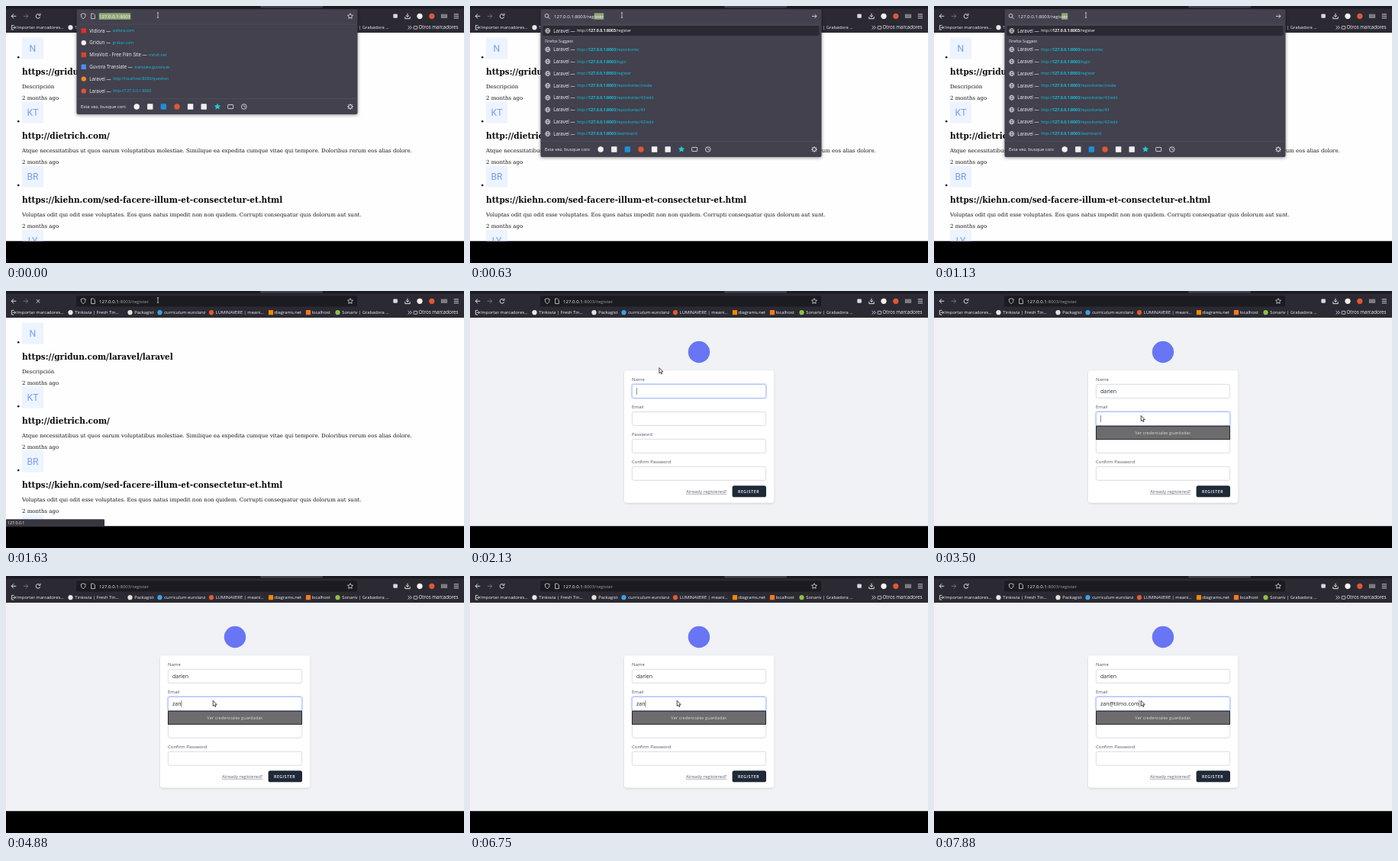
Animation, 600 px wide and 337 px high, one loop 8000 ms. Source, as an HTML page with a canvas:

```html
<!DOCTYPE html>
<html lang="es">
<head>
<meta charset="utf-8">
<title>Register</title>
<style>
html, body { margin: 0; width: 100%; height: 100%; overflow: hidden; background: #000; }
canvas { display: block; width: 600px; height: 337px; }
</style>
</head>
<body>
<canvas id="stage"></canvas>
<script>
const LOOP = 8000;
const UI = '"Open Sans", "Noto Sans", sans-serif';
const SERIF = '"DejaVu Serif", "Noto Serif", serif';
const canvas = document.getElementById('stage');
const c = canvas.getContext('2d');
const dpr = window.devicePixelRatio || 1;
canvas.width = 600 * dpr;
canvas.height = 337 * dpr;

const LIGHT = '#f4f4f7', DIM = '#9d9ca6', BAR = '#2b2a33', DARK = '#1c1b22', PANEL = '#42414d', CYAN = '#19bfdc', SELECT = '#8fa876';

// ---------- helpers ----------
function rect(x, y, w, h, fill, r = 0) {
  c.beginPath();
  c.roundRect(x, y, w, h, r);
  c.fillStyle = fill;
  c.fill();
}

function frame(x, y, w, h, color, r = 0, lw = 0.6) {
  c.beginPath();
  c.roundRect(x, y, w, h, r);
  c.strokeStyle = color;
  c.lineWidth = lw;
  c.stroke();
}

function dot(x, y, r, fill) {
  c.beginPath();
  c.arc(x, y, r, 0, 7);
  c.fillStyle = fill;
  c.fill();
}

function ring(x, y, r, color, lw = 0.8, from = 0, to = 7) {
  c.beginPath();
  c.arc(x, y, r, from, to);
  c.strokeStyle = color;
  c.lineWidth = lw;
  c.stroke();
}

function line(color, lw, ...p) {
  c.beginPath();
  c.moveTo(p[0], p[1]);
  for (let i = 2; i < p.length; i += 2) c.lineTo(p[i], p[i + 1]);
  c.strokeStyle = color;
  c.lineWidth = lw;
  c.stroke();
}

// Draws text centred on y and returns the x where it ends.
function text(s, x, y, size, color, { font = UI, weight = 400, align = 'left' } = {}) {
  c.font = `${weight} ${size}px ${font}`;
  c.textAlign = align;
  c.fillStyle = color;
  c.fillText(s, x, y + size * 0.35);
  return x + c.measureText(s).width;
}

function star(x, y, r, color, filled) {
  c.beginPath();
  for (let i = 0; i < 10; i++) {
    const a = i * Math.PI / 5 - Math.PI / 2, d = i % 2 ? r * 0.48 : r;
    c.lineTo(x + d * Math.cos(a), y + d * Math.sin(a));
  }
  c.closePath();
  c.fillStyle = c.strokeStyle = color;
  c.lineWidth = 0.7;
  filled ? c.fill() : c.stroke();
}

function globe(x, y) {
  ring(x, y, 3, LIGHT, 0.7);
  c.beginPath();
  c.ellipse(x, y, 1.3, 3, 0, 0, 7);
  c.stroke();
  line(LIGHT, 0.6, x - 3, y, x + 3, y);
}

const clamp = v => Math.max(0, Math.min(1, v));
const ease = v => v * v * (3 - 2 * v);

// Number of entries in a list of times already passed.
const passed = (t, times) => times.filter(at => t >= at).length;

// ---------- browser ----------
const bookmarks = [
  [84.5, 'Tinkovia | Fresh Tin…', '#e8e8ea', 1],
  [162.5, 'Packagist', '#e6e2da', 1],
  [201.5, 'curriculum eurolanz', '#3aa3e0', 1],
  [269, 'LUMINAVERE | meani…', '#e5592c', 1],
  [347, 'diagrams.net', '#f08705', 0],
  [396, 'localhost', '#f47a20', 0],
  [434.5, 'Sonariv | Grabadora …', '#8ac43f', 1]
];

function badge(x, y, r, color, round) {
  if (round) dot(x, y, r, color);
  else rect(x - r, y - r, r * 2, r * 2, color, 0.6);
}

function toolbar(loading) {
  rect(0, 0, 600, 3.5, DARK);
  rect(333, 0, 82, 2.4, PANEL, 1);
  rect(0, 3.2, 600, 31.8, BAR);

  line(LIGHT, 0.9, 10, 10.3, 7.2, 13.3, 10, 16.3);
  line(LIGHT, 0.9, 7.2, 13.3, 13.3, 13.3);
  line('#77767f', 0.9, 26, 10.3, 28.8, 13.3, 26, 16.3);
  line('#77767f', 0.9, 22.6, 13.3, 28.8, 13.3);
  if (loading) {
    line(LIGHT, 0.8, 39.8, 11, 44.2, 15.6);
    line(LIGHT, 0.8, 44.2, 11, 39.8, 15.6);
  } else {
    ring(42, 13.4, 2.8, LIGHT, 0.9, 0.3, 5.5);
    line(LIGHT, 0.8, 45, 9.8, 45, 12.3, 42.6, 12.3);
  }

  rect(507.3, 10.6, 5.6, 5.2, '#d9d9dd', 1);
  line(LIGHT, 0.9, 526, 9.6, 526, 14.2);
  line(LIGHT, 0.9, 524, 12.2, 526, 14.4, 528, 12.2);
  line(LIGHT, 0.9, 522.8, 14, 522.8, 16.6, 529.2, 16.6, 529.2, 14);
  dot(542, 13.3, 3.6, '#f2f2f4');
  dot(557.8, 13.3, 3.6, '#de5833');
  for (let i = 0; i < 4; i++) line('#d5d5da', 1, 570.8 + i * 2.1, 10.6, 570.8 + i * 2.1, 16);
  for (let i = 0; i < 3; i++) line(LIGHT, 0.8, 586.8, 10.8 + i * 2.5, 593, 10.8 + i * 2.5);

  line(LIGHT, 0.8, 10.4, 25.4, 7.4, 25.4, 7.4, 31, 10.4, 31);
  line(LIGHT, 0.8, 8.6, 28.2, 12.6, 28.2);
  line(LIGHT, 0.8, 11, 26.6, 12.8, 28.2, 11, 29.8);
  text('Importar marcadores…', 14, 28.2, 5.75, LIGHT);
  for (const [x, label, color, round] of bookmarks) {
    badge(x, 28.2, 3.1, color, round);
    text(label, x + (round ? 5.8 : 4.6), 28.2, 5.8, LIGHT);
  }
  for (const x of [526.6, 529.2]) line(LIGHT, 0.8, x, 26, x + 2.2, 28.2, x, 30.4);
  frame(534.2, 26.4, 4.6, 3.8, LIGHT, 0.5, 0.7);
  text('Otros marcadores', 540.5, 28.2, 6.2, LIGHT);
}

function shieldAndPage() {
  c.beginPath();
  c.moveTo(101.2, 9.7);
  c.lineTo(104.2, 10.8);
  c.quadraticCurveTo(104.4, 15.2, 101.2, 16.9);
  c.quadraticCurveTo(98, 15.2, 98.2, 10.8);
  c.closePath();
  c.strokeStyle = LIGHT;
  c.lineWidth = 0.7;
  c.stroke();
  line(LIGHT, 0.7, 111.6, 10, 114.6, 10, 116.4, 11.8, 116.4, 16.6, 111.6, 16.6, 111.6, 10);
}

function closedUrl(path) {
  rect(92, 6.3, 368, 14.2, DARK, 2);
  shieldAndPage();
  const x = text('127.0.0.1', 122, 13.4, 6.1, LIGHT);
  text(':8003' + path, x, 13.4, 6.1, DIM);
  star(451, 13.4, 3.7, LIGHT);
}

function panel(bottom) {
  c.save();
  c.shadowColor = 'rgba(0,0,0,.45)';
  c.shadowBlur = 4 * dpr;
  c.shadowOffsetY = dpr;
  rect(92.5, 4.2, 368, bottom - 4.2, PANEL, 2);
  c.restore();
  line('#55545f', 0.5, 96, 24, 457, 24);
  line('#55545f', 0.5, 92.5, bottom - 20.5, 460.5, bottom - 20.5);

  const y = bottom - 10;
  text('Esta vez, busque con:', 98, y, 6, LIGHT);
  const engines = [['#f5f5f5', 1], ['#f1efe9', 0], ['#1e8fd5', 0], ['#de5833', 1], ['#f5f5f5', 0], ['#eeeeee', 0]];
  engines.forEach(([color, round], i) => badge(171.2 + i * 17.6, y, 3.7, color, round));
  star(277, y, 4.4, '#22c8d8', true);
  frame(290.7, y - 2.6, 7, 5.2, LIGHT, 0.8, 0.8);
  ring(311.8, y, 3.3, LIGHT);
  line(LIGHT, 0.7, 311.8, y - 2, 311.8, y, 313.4, y + 0.9);
  ring(451, y, 2.4, LIGHT, 1);
  for (let i = 0; i < 8; i++) {
    const a = i * Math.PI / 4, dx = Math.cos(a), dy = Math.sin(a);
    line(LIGHT, 0.9, 451 + dx * 2.6, y + dy * 2.6, 451 + dx * 3.8, y + dy * 3.8);
  }
}

const topSites = [
  ['Vidlora', 'vidlora.com', '#e0302a', 0],
  ['Gridun', 'gridun.com', '#f2f2f4', 1],
  ['MiraVolt - Free Film Site', 'mirvlt.net', '#d8432b', 0],
  ['Guvora Translate', 'translate.guvora.es', '#4c8bf5', 0],
  ['Laravel', 'http://localhost:8000/question', '#f08a2c', 1],
  ['Laravel', 'http://127.0.0.1:8000', '#e5503a', 1]
];

function topSitesPanel(selected) {
  panel(142);
  shieldAndPage();
  if (selected) rect(121.8, 9.3, 41.4, 8.4, SELECT);
  const end = text('127.0.0.1:8003', 122, 13.4, 6.1, LIGHT);
  if (!selected) line(LIGHT, 0.5, end + 0.4, 10, end + 0.4, 17);
  star(451, 13.4, 3.7, LIGHT);
  topSites.forEach(([name, url, color, round], i) => {
    const y = 32.4 + i * 15.8;
    badge(101.8, y, 3.2, color, round);
    const x = text(name + ' — ', 109.3, y, 6.2, LIGHT);
    text(url, x + 0.8, y, 5.2, CYAN);
  });
}

const visited = ['repositories', 'login', 'register', 'repositories/create', 'repositories/43/edit', 'repositories/43', 'repositories/42/edit', 'dashboard'];

function visitedRow(path, y, color) {
  globe(101.8, y);
  let x = text('Laravel — ', 109.3, y, 6.2, LIGHT);
  x = text('http://', x + 0.8, y, 5.2, color);
  x = text('127.0.0.1:8003', x, y, 5.2, color, { weight: 700 });
  return text('/' + path, x, y, 5.2, color);
}

function suggestPanel(typed) {
  panel(198);
  ring(100.6, 12.8, 2.4, LIGHT, 0.8);
  line(LIGHT, 0.9, 102.3, 14.5, 104.4, 16.6);
  const word = 'register';
  const x = text('127.0.0.1:8003/' + word.slice(0, typed), 110, 13.4, 6.1, LIGHT);
  if (typed) {
    const rest = word.slice(typed);
    c.font = `400 6.1px ${UI}`;
    rect(x, 9.3, c.measureText(rest).width, 8.4, SELECT);
    text(rest, x, 13.4, 6.1, LIGHT);
  }
  line(LIGHT, 0.8, 448, 13.4, 454, 13.4);
  line(LIGHT, 0.8, 451.6, 11, 454, 13.4, 451.6, 15.8);
  rect(95.5, 26, 362, 13, BAR, 1.5);
  visitedRow(word, 32.5, LIGHT);
  text('Firefox Suggest', 98.3, 46, 5.2, LIGHT);
  visited.forEach((path, i) => visitedRow(path, 57 + i * 15.8, CYAN));
}

// ---------- pages ----------
const repos = [
  ['N', 'https://gridun.com/laravel/laravel', 'Descripción'],
  ['KT', 'http://dietrich.com/', 'Atque necessitatibus ut quos earum voluptatibus molestiae. Similique ea expedita cumque vitae qui tempore. Doloribus rerum eos alias dolore.'],
  ['BR', 'https://kiehn.com/sed-facere-illum-et-consectetur-et.html', 'Voluptas odit qui odit esse voluptates. Eos quos natus impedit non non quidem. Corrupti consequatur quis dolorum aut sunt.'],
  ['LY', '', '']
];

function listPage() {
  rect(0, 35, 600, 273.3, '#fefefe');
  c.save();
  c.beginPath();
  c.rect(0, 35, 600, 273.3);
  c.clip();
  repos.forEach(([initials, url, about], i) => {
    const y = 41.5 + i * 83.9;
    rect(21, y, 28.1, 28.1, '#ebf4ff');
    text(initials, 35, y + 14, 12.3, '#7f9cf5', { font: 'Roboto, sans-serif', align: 'center' });
    dot(16.2, y + 25.8, 1.3, '#111');
    if (!url) return;
    text(url, 21, y + 45, 10.54, '#0b0b0b', { font: SERIF, weight: 700 });
    text(about, 21, y + 64.2, 7.03, '#161616', { font: SERIF });
    text('2 months ago', 21, y + 79.5, 7.03, '#161616', { font: SERIF });
  });
  c.restore();
}

function field(label, y, focused, value) {
  text(label, 212, y - 6, 6, '#4a5160');
  if (focused) frame(211.8, y - 0.2, 176.4, 18.8, '#d5e1fe', 3, 2);
  rect(212, y, 176, 18.4, '#fff', 2.6);
  frame(212.3, y + 0.3, 175.4, 18, focused ? '#9db5fb' : '#d0d4dc', 2.6, 0.8);
  const x = text(value, 218, y + 9.3, 7.03, '#1f2430');
  if (focused) line('#333a48', 0.6, x + 0.4, y + 4.8, x + 0.4, y + 14);
}

const savedNames = ['Darlen Tobioor', 'darlen', 'hola', 'Maribela Torena Caldero Quinzar', 'Darlen Tobior Mirlanda Posela', 'empadonamiento'];

function formPage(t) {
  const onEmail = t >= 3380;
  const mail = 'zan@tilmo.com'.slice(0, passed(t, [4000, 4130, 4250, 7130, 7250, 7380, 7380, 7500, 7630, 7630, 7750, 7750, 7880]));
  rect(0, 35, 600, 273.3, '#f1f2f5');
  dot(300, 80, 14.2, '#6875f5');

  c.save();
  c.shadowColor = 'rgba(0,0,0,.14)';
  c.shadowBlur = 3 * dpr;
  c.shadowOffsetY = dpr;
  rect(202, 104.3, 196.3, 173.4, '#fff', 3.5);
  c.restore();

  field('Name', 122.1, !onEmail, t >= 3000 ? 'darlen' : '');
  field('Email', 158.2, onEmail, mail);
  field('Password', 194, false, '');
  field('Confirm Password', 230, false, '');

  const end = text('Already registered?', 283, 263, 6, '#5a6270');
  line('#5a6270', 0.5, 283, 266.3, end, 266.3);
  rect(343.6, 255.3, 44.4, 15, '#1f2937', 2.6);
  c.letterSpacing = '0.53px';
  text('REGISTER', 351, 262.9, 5.27, '#fff', { weight: 600 });
  c.letterSpacing = '0px';

  if (t >= 2500 && t < 3000) {
    rect(212, 140.4, 176, 55.4, '#38373d');
    savedNames.forEach((name, i) => text(name, 215, 146.4 + i * 8.75, 5.7, '#ececef'));
    rect(385.4, 142, 1.8, 25, '#808087', 0.9);
  }
  if (onEmail) {
    rect(212, 176.8, 176, 18.2, '#6d6b6e');
    frame(212.5, 177.3, 175, 17.2, '#2c2c33', 0, 1.1);
    text('Ver credenciales guardadas', 299.7, 185.8, 5.7, '#d6d5d8', { align: 'center' });
  }
}

function statusBar() {
  rect(0, 299.3, 129, 9.7, '#38373f', 1);
  text('127.0.0.1', 2, 304.2, 5.3, LIGHT);
}

// ---------- pointer ----------
const route = [[1800, 199, 12], [2300, 265.5, 132.7], [2700, 265.5, 132.7], [2900, 266, 153], [3020, 266, 153], [3250, 271.2, 163.4]];

function pointer(t) {
  let [, x, y] = route[0];
  for (let i = 1; i < route.length; i++) {
    const [t0, x0, y0] = route[i - 1], [t1, x1, y1] = route[i];
    if (t < t0) break;
    const k = ease(clamp((t - t0) / (t1 - t0)));
    x = x0 + (x1 - x0) * k;
    y = y0 + (y1 - y0) * k;
  }
  if (y < 21) {
    line('#e8e8ec', 0.7, x - 1.2, y - 3.2, x + 1.2, y - 3.2);
    line('#e8e8ec', 0.7, x, y - 3.2, x, y + 3.2);
    line('#e8e8ec', 0.7, x - 1.2, y + 3.2, x + 1.2, y + 3.2);
    return;
  }
  c.beginPath();
  const shape = [0, 0, 0, 7.2, 1.6, 5.8, 2.7, 8.2, 3.9, 7.6, 2.9, 5.3, 5, 5.1];
  for (let i = 0; i < shape.length; i += 2) c.lineTo(x + shape[i], y + shape[i + 1]);
  c.closePath();
  c.fillStyle = '#f4f4f4';
  c.fill();
  c.strokeStyle = '#222';
  c.lineWidth = 0.8;
  c.stroke();
}

// ---------- timeline ----------
function draw(t) {
  c.setTransform(dpr, 0, 0, dpr, 0, 0);
  rect(0, 0, 600, 337, '#000');
  if (t < 1750) listPage();
  else formPage(t);

  toolbar(t >= 1250 && t < 1880);
  if (t < 250) topSitesPanel(t < 130);
  else if (t < 1250) suggestPanel(passed(t, [380, 500, 630, 750, 880]));
  else closedUrl('/register');

  if (t >= 1380 && t < 1880) statusBar();
  pointer(t);
}

const start = performance.now();
function tick() {
  draw((performance.now() - start) % LOOP);
  requestAnimationFrame(tick);
}
tick();
</script>
</body>
</html>
```
